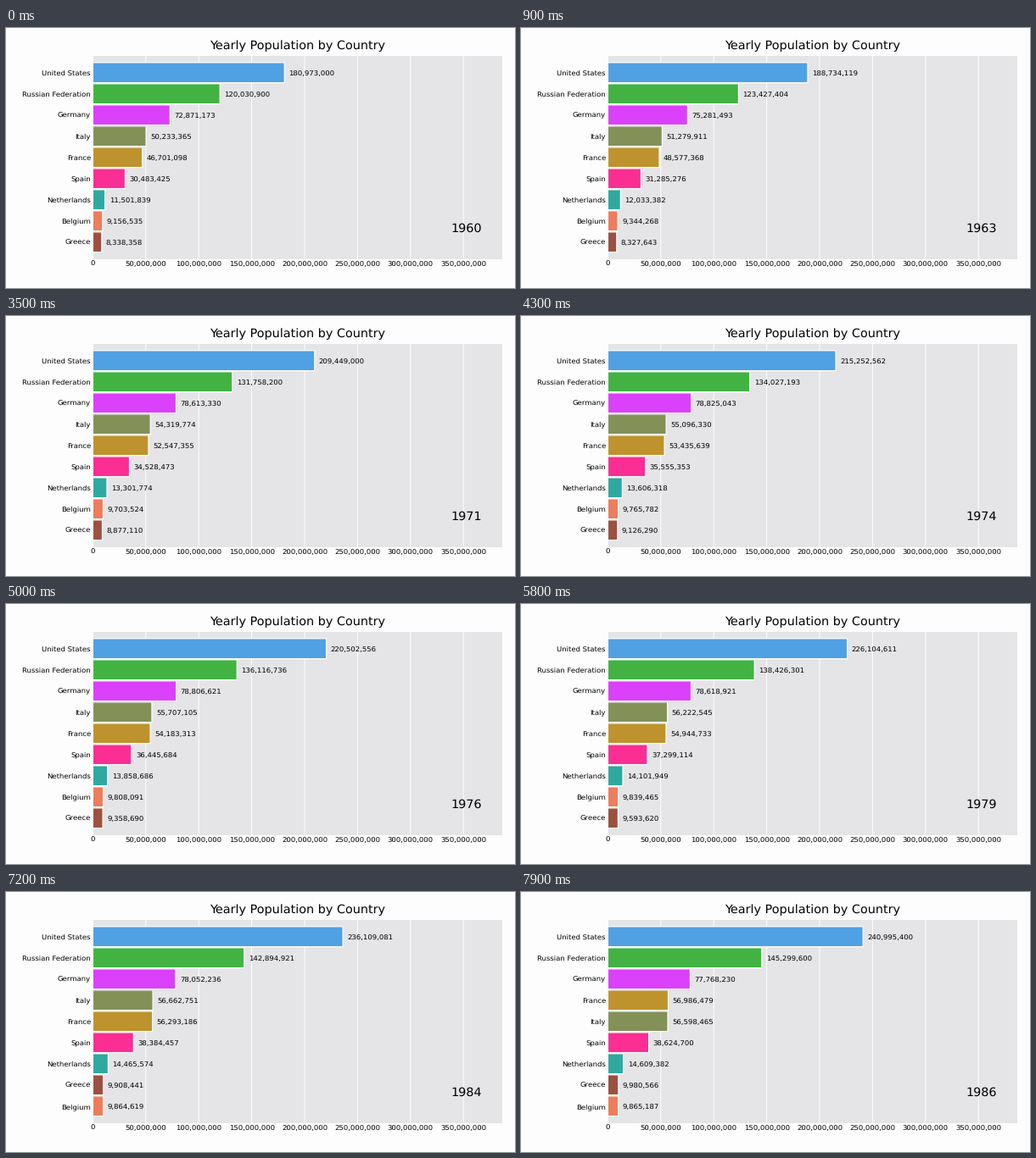
Animation of 600x307 px, one loop 8000 ms. Source, as a matplotlib script:

```python
import numpy as np
import matplotlib.pyplot as plt
from matplotlib.animation import FuncAnimation

W, H, DPI = 600, 307, 100
FRAMES, INTERVAL = 80, 100
FIRST_YEAR, YEARS = 1960, 28

plt.rcParams["font.family"] = "DejaVu Sans"
plt.rcParams["text.hinting"] = "none"

# Bar colour and population at four key times; a cubic joins them
KEY_TIMES = [0.1, 11.8, 21.8, 26.4]
COUNTRIES = {
    "United States": ("#50a0e4", 180973000, 209449000, 231224400, 240995400),
    "Russian Federation": ("#42b342", 120030900, 131758200, 140646600, 145299600),
    "Germany": ("#db40fa", 72871173, 78613330, 78348274, 77768230),
    "Italy": ("#839158", 50233365, 54319774, 56535173, 56598465),
    "France": ("#be932d", 46701098, 52547355, 55629494, 56986479),
    "Spain": ("#fb2e93", 30483425, 34528473, 37940536, 38624700),
    "Netherlands": ("#2fa9a0", 11501839, 13301774, 14299594, 14609382),
    "Belgium": ("#ed7d5c", 9156535, 9703524, 9856839, 9865187),
    "Greece": ("#9b5141", 8338358, 8877110, 9777480, 9980566),
}
COLORS = [c[0] for c in COUNTRIES.values()]
CURVES = np.linalg.solve(np.vander(KEY_TIMES),
                         np.array([c[1:] for c in COUNTRIES.values()], float).T)
N = len(COUNTRIES)


def populations(t):
    return np.polyval(CURVES, t)


RANKS = np.array([populations(y).argsort().argsort() + 1 for y in range(YEARS)])


def slots(t):
    """Bar positions, sliding linearly between yearly rankings."""
    y = int(t)
    return RANKS[y] + (RANKS[y + 1] - RANKS[y]) * (t - y)


def px(size):
    return size * 72 / DPI


LEFT, RIGHT, TOP, BOTTOM = 102.4, 585, 32.7, 272.8
PX_PER_MILLION = 62.4 / 50

fig = plt.figure(figsize=(W / DPI, H / DPI), dpi=DPI, facecolor="#fefdfe")
ax = fig.add_axes([LEFT / W, 1 - BOTTOM / H, (RIGHT - LEFT) / W, (BOTTOM - TOP) / H],
                  facecolor="#e5e4e6")
ax.set_xlim(0, (RIGHT - LEFT) / PX_PER_MILLION)
ax.set_ylim(0.2, N + 0.8)
ax.spines[:].set_visible(False)
ax.set_axisbelow(True)
ax.grid(True, axis="x", color="white", lw=px(1), snap=False)
ticks = range(0, 351, 50)
ax.set_xticks(ticks, [f"{m * 10**6:,}" for m in ticks])
ax.set_yticks([])
ax.tick_params(length=0, pad=px(2.2), labelsize=px(8.5))
fig.text((LEFT + RIGHT) / 2 / W, 1 - 25 / H, "Yearly Population by Country",
         size=px(14.4), ha="center", va="baseline")
year_text = fig.text(560.5 / W, 1 - 237 / H, "", size=px(14.4), ha="right", va="center")

bars = ax.barh(range(1, N + 1), 0, height=0.95, color=COLORS,
               edgecolor="white", lw=px(1.2), snap=False)
small = dict(size=px(8.5), va="center_baseline")
values = [ax.text(0, 0, "", **small) for _ in COUNTRIES]
labels = [ax.text(-2.4 / PX_PER_MILLION, 0, name, ha="right", **small)
          for name in COUNTRIES]


def update(frame):
    # ten steps per year, sampled about three times a year
    t = round(1 + frame * 10 / 3) / 10
    for bar, value, label, people, y in zip(bars, values, labels,
                                            populations(t), slots(t)):
        width = people / 1e6
        bar.set_width(width)
        bar.set_y(y - bar.get_height() / 2)
        value.set_position((width + 5 / PX_PER_MILLION, y))
        value.set_text(f"{round(people):,}")
        label.set_y(y)
    year_text.set_text(str(FIRST_YEAR + int(t)))
    return [*bars, *values, *labels, year_text]


anim = FuncAnimation(fig, update, frames=FRAMES, interval=INTERVAL,
                     repeat=True, repeat_delay=0)
plt.show()
```
